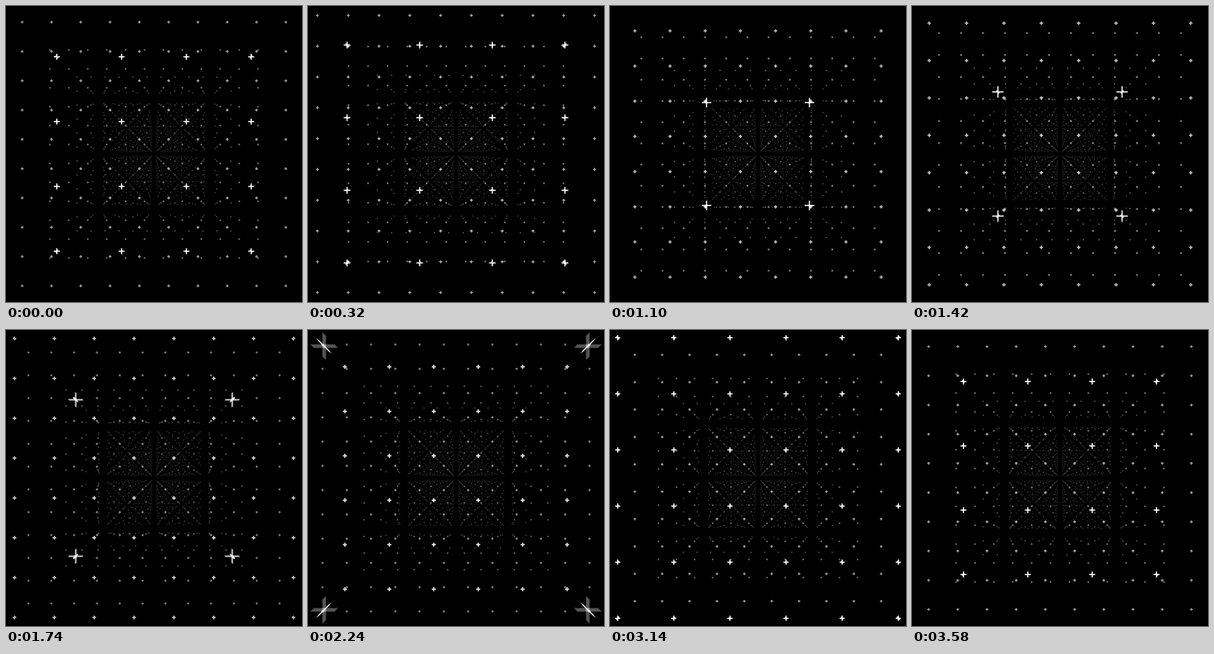
Recreate the animation shown at these times as an HTML page with a canvas. Size 500x500 px, loop 3600 ms.

```html
<!DOCTYPE html>
<html lang="en">
<head>
<meta charset="utf-8">
<title>Lattice flight</title>
<style>
  html, body { margin: 0; width: 100%; height: 100%; overflow: hidden; background: #000; }
  canvas { display: block; width: 500px; height: 500px; }
</style>
</head>
<body>
<canvas id="stage" width="500" height="500"></canvas>
<script>
const ctx = document.getElementById('stage').getContext('2d');

const SIZE = 500;
const CENTER = SIZE / 2;
const LOOP = 3600;
const STEP = 20;
const SCALE = 90.3;         // pixels per grid cell at depth 1
const START_DEPTH = 0.825;  // nearest layer when the loop begins
const LAYERS = 12;
const REACH = 5.5;          // 12 x 12 points per layer
const DEPTH_RATIO = 4.8;    // layer gap measured in grid cells
const ARM = 0.046;
const ARM_Z = ARM / DEPTH_RATIO;
const STROKE = 2;
const BLUR_SAMPLES = 12;

function drawJack(gx, gy, z) {
  const s = SCALE / z;
  const x = CENTER + gx * s, y = CENTER + gy * s, arm = ARM * s;
  const near = SCALE / (z - ARM_Z), far = SCALE / (z + ARM_Z);
  ctx.beginPath();
  ctx.moveTo(x - arm, y);
  ctx.lineTo(x + arm, y);
  ctx.moveTo(x, y - arm);
  ctx.lineTo(x, y + arm);
  ctx.moveTo(CENTER + gx * far, CENTER + gy * far);
  ctx.lineTo(CENTER + gx * near, CENTER + gy * near);
  ctx.stroke();
}

function drawLayer(z, fade) {
  const s = SCALE / z;
  const limit = CENTER + 10 + s * 0.1;
  const blurred = z < 0.8;
  ctx.globalCompositeOperation = blurred ? 'lighter' : 'source-over';

  for (let gy = -REACH; gy <= REACH; gy++) {
    if (Math.abs(gy * s) > limit) continue;
    for (let gx = -REACH; gx <= REACH; gx++) {
      if (Math.abs(gx * s) > limit) continue;
      const light = fade * Math.min(1, 5.8 / Math.hypot(gx, gy, z * DEPTH_RATIO));
      const samples = blurred ? BLUR_SAMPLES : 1;
      const level = Math.round(255 * light / samples);
      ctx.strokeStyle = `rgb(${level},${level},${level})`;
      for (let i = 0; i < samples; i++) {
        const shift = ((i + 0.5) / samples - 0.5) * STEP / LOOP;
        drawJack(gx, gy, z - shift);
      }
    }
  }
}

function render(time) {
  const progress = Math.floor((time % LOOP) / STEP) * STEP / LOOP;
  ctx.globalCompositeOperation = 'source-over';
  ctx.fillStyle = '#000';
  ctx.fillRect(0, 0, SIZE, SIZE);
  ctx.lineWidth = STROKE;
  for (let k = LAYERS; k >= 0; k--) {
    const z = START_DEPTH + k - progress;
    if (z < 0.05) continue;
    drawLayer(z, k === LAYERS ? progress : 1);
  }
}

function tick() {
  render(performance.now());
  requestAnimationFrame(tick);
}
tick();
</script>
</body>
</html>
```
